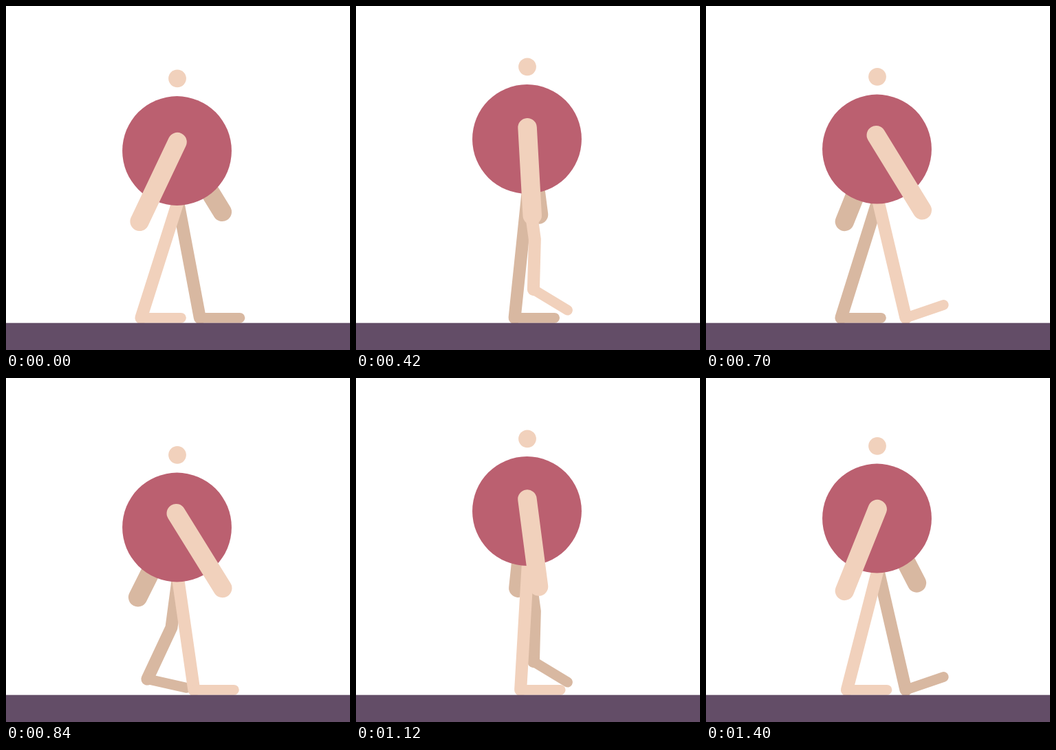
An HTML page with a canvas that plays this animation: 500x500 px, repeating every 1470 ms.

```html
<!DOCTYPE html>
<html lang="en">
<head>
<meta charset="utf-8">
<title>Walk cycle</title>
<style>
  html, body { margin: 0; height: 100%; overflow: hidden; background: #fff; }
  canvas { display: block; }
</style>
</head>
<body>
<canvas id="stage" width="500" height="500"></canvas>
<script>
const ctx = document.getElementById('stage').getContext('2d');
const STEP = 70, STEPS = 21;
const SKIN = '#f1d1bc', SHADE = '#d8b8a1', SHIRT = '#bb6070', GROUND = '#634d67';
const rad = deg => deg * Math.PI / 180;

// Sine-eased value at time n through [time, value] keys.
function ease(n, keys) {
  const i = Math.max(1, keys.findIndex(key => key[0] >= n));
  const [t0, v0] = keys[i - 1], [t1, v1] = keys[i];
  return v0 + (v1 - v0) * (1 - Math.cos(Math.PI * (n - t0) / (t1 - t0))) / 2;
}

const bodyY = n => ease(n < 2 ? n + STEPS : n, [[2, 217], [7, 191], [12, 217], [17, 191], [23, 217]]);
const armAngle = n => ease(n < 1 ? n + STEPS : n, [[1, -26.6], [11, 33], [22, -26.6]]);

function line(color, width, ...points) {
  ctx.strokeStyle = color;
  ctx.lineWidth = width;
  ctx.beginPath();
  points.forEach(([x, y]) => ctx.lineTo(x, y));
  ctx.stroke();
}

function disc(color, x, y, r) {
  ctx.fillStyle = color;
  ctx.beginPath();
  ctx.arc(x, y, r, 0, 2 * Math.PI);
  ctx.fill();
}

function arm(n, cy, color) {
  const a = rad(armAngle(n % STEPS)), tilt = a + rad(10);
  const x = 241.3 + 8 * Math.cos(tilt), y = cy - 15 - 8 * Math.sin(tilt);
  line(color, 27.5, [x, y], [x + 128 * Math.sin(a), y + 128 * Math.cos(a)]);
}

// Swings forward for 10 steps, then slides back on the ground for 11.
function leg(n, cy, color) {
  n %= STEPS;
  let x = 290.4 - (n - 10) * 94 / 11, y = 453.3, bend = 0, pitch = -19 * Math.max(0, 11 - n);
  if (n < 10) {
    x = ease(n, [[0, 196.4], [10, 290.4]]);
    y -= ease(n, [[0, 0], [5, 45.5], [10, 0]]);
    bend = ease(n, [[0, 0], [3, 17], [8, 0], [10, 0]]);
    pitch = ease(n, [[0, 0], [5, 36.5], [10, -19]]);
  }
  const hipY = cy + 74, a = rad(pitch);
  line(color, 18, [250, hipY], [(250 + x) / 2 + bend, (hipY + y) / 2 - bend / 8], [x, y]);
  line(color, 14.8, [x, y], [x + 58 * Math.cos(a), y + 58 * Math.sin(a)]);
}

function draw(now) {
  const n = Math.floor(now / STEP) % STEPS, cy = bodyY(n);
  ctx.clearRect(0, 0, 500, 500);
  ctx.lineCap = ctx.lineJoin = 'round';
  arm(n + 10, cy, SHADE);
  leg(n + 11, cy, SHADE);
  leg(n, cy, SKIN);
  disc(SHIRT, 248.5, cy, 79.4);
  disc(SKIN, 249, cy - 105.2, 12.9);
  arm(n, cy, SKIN);
  ctx.fillStyle = GROUND;
  ctx.fillRect(0, 460.7, 500, 40);
}

const start = performance.now();
function tick() {
  draw(performance.now() - start);
  requestAnimationFrame(tick);
}
tick();
</script>
</body>
</html>
```
